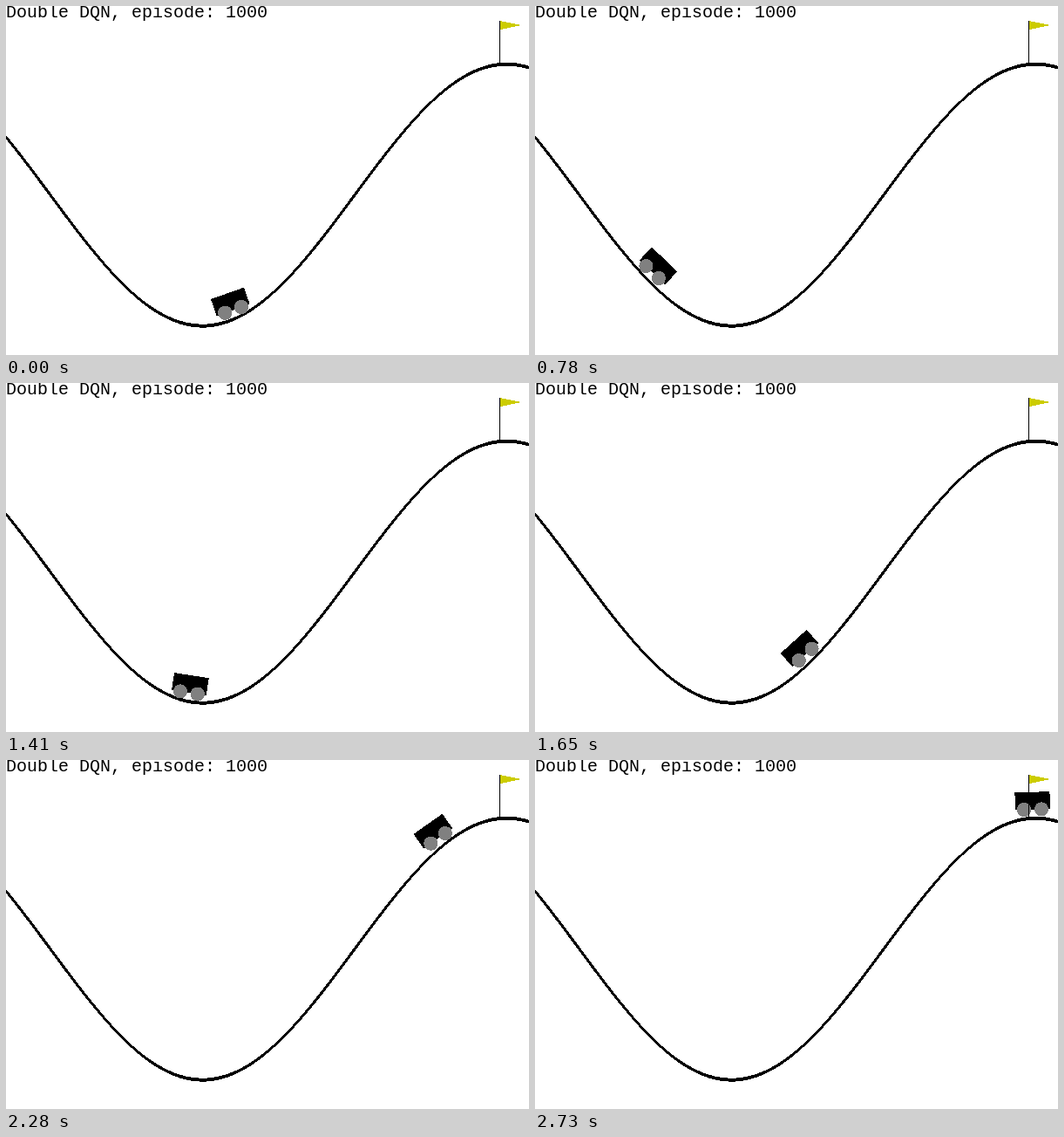
A matplotlib script for the animation above (2790 ms loop, 600 by 400 pixels).

```python
import numpy as np
import matplotlib.pyplot as plt
from matplotlib.animation import FuncAnimation
from matplotlib.patches import Circle, Polygon, Rectangle

W, H, DPI = 600, 400, 100
X_MIN, X_MAX, GOAL = -1.2, 0.6, 0.5
SCALE = W / (X_MAX - X_MIN)
STEP_MS, STEPS, FRAMES = 30, 92, 93
START = -0.408
SWITCH = 28             # last step of pushing left
COAST = {19, 29, 70}    # steps without thrust
INSET = 0.5             # hard-edged fills take every pixel they touch


def to_px(x):
    """Track position to stage pixels, y pointing up."""
    return (x - X_MIN) * SCALE, (0.45 * np.sin(3 * x) + 0.55) * SCALE


def drive():
    """Mountain car positions, one per step."""
    x, v, path = START, 0.0, [START]
    for step in range(1, STEPS):
        push = 0 if step in COAST else (-1 if step <= SWITCH else 1)
        v += 0.001 * push - 0.0025 * np.cos(3 * x)
        x += v
        path.append(x)
    return path


def place(points, x):
    """Turn car coordinates by the slope and move them onto the track."""
    a = np.cos(3 * x)
    c, s = np.cos(a), np.sin(a)
    return np.asarray(points) @ np.array([[c, s], [-s, c]]) + to_px(x)


fig = plt.figure(figsize=(W / DPI, H / DPI), dpi=DPI, facecolor="white")
ax = fig.add_axes([0, 0, 1, 1])
ax.set(xlim=(0, W), ylim=(0, H))
ax.axis("off")
flat = dict(lw=0, antialiased=False, snap=False)

# The stroke is 4 px along the minor axis, so steep parts look thinner.
xs = np.linspace(X_MIN, X_MAX, 100)
px, py = to_px(xs)
slope = np.abs(1.35 * np.cos(3 * xs))
half = 2 * np.maximum(1, slope) - INSET * (1 + slope)
ax.fill_between(px, py - half, py + half, color="black", zorder=1, **flat)

left, right, low, high = -20 + INSET, 20 - INSET, 10 + INSET, 30 - INSET
BODY = [(left, low), (left, high), (right, high), (right, low)]
HUBS = [(10, 10), (-10, 10)]
body = ax.add_patch(Polygon(BODY, fc="black", zorder=2, **flat))
wheels = [ax.add_patch(Circle(h, 8 - INSET, fc="0.5", zorder=3, **flat))
          for h in HUBS]

fx, fy = to_px(GOAL)
mid = fy + 45
ax.add_patch(Polygon([(fx + INSET, mid + 4.4), (fx + INSET, mid - 4.4),
                      (fx + 22, mid)], fc=(0.8, 0.8, 0), zorder=4, **flat))
ax.add_patch(Rectangle((int(fx), fy), 1, 50, fc="black", zorder=5, **flat))

ax.text(0, H - 13, "Double DQN, episode: 1000", family="Liberation Mono",
        size=20 * 72 / DPI, color="black", va="baseline", zorder=6)

path = drive()


def draw(i):
    x = path[min(i, STEPS - 1)]
    body.set_xy(place(BODY, x))
    for wheel, hub in zip(wheels, place(HUBS, x)):
        wheel.center = tuple(hub)
    return [body, *wheels]


anim = FuncAnimation(fig, draw, frames=FRAMES, interval=STEP_MS,
                     repeat=True, repeat_delay=0, blit=False)
plt.show()
```
